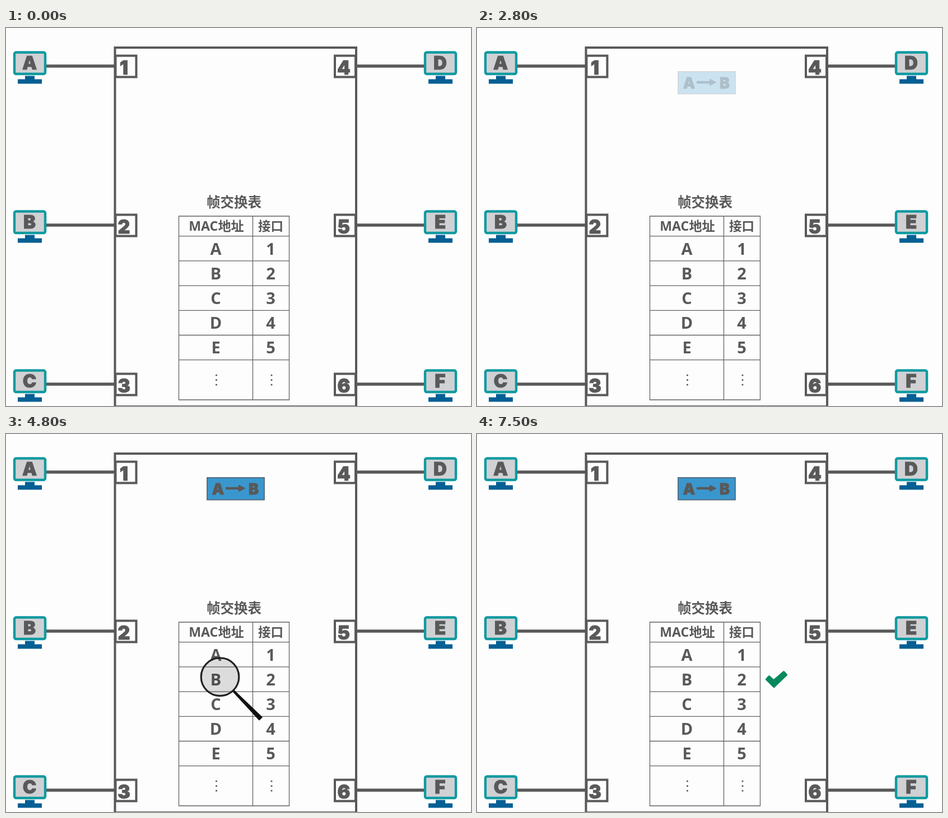
An HTML page for the animation above (8 s loop, 830 by 675 pixels).

```html
<!DOCTYPE html>
<html lang="zh-CN">
<head>
<meta charset="utf-8">
<title>帧交换表</title>
<style>
  html, body { margin: 0; width: 100%; height: 100%; overflow: hidden; background: #fdfdfd; }
  svg { display: block; width: 100vw; height: 100vh; }
  text { fill: #595959; text-anchor: middle; }
  .heavy { font-family: Inter, "Liberation Sans", sans-serif; font-weight: 900; stroke: #595959; stroke-width: .9; }
  .cell { font: 700 29px "Open Sans", "Noto Sans", sans-serif; }
  .han { font-family: "Noto Sans", "Noto Sans CJK SC", "Noto Sans CJK", sans-serif; font-weight: 700; }
</style>
</head>
<body>
<svg id="stage" viewBox="0 0 830 675">
  <g id="network"></g>
  <g id="table"></g>
  <g id="packet">
    <rect x="1" y="1" width="102" height="39.5" fill="#3a97ce" stroke="#52687a" stroke-width="1.8"/>
    <text class="heavy" font-size="27" x="20.5" y="31">A</text>
    <text class="heavy" font-size="27" x="84" y="31">B</text>
    <path d="M34 17.8H57V13.5L70 20L57 26.5V22.2H34Z" fill="#595959"/>
  </g>
  <g id="lens">
    <circle r="33.8" fill="#000" fill-opacity=".13" stroke="#222" stroke-width="3.2"/>
    <path d="M22.5 26.5L25.5 23.5L76 72L70 78Z" fill="#111"/>
  </g>
  <path id="check" d="M-18 0L-13 -5.5L-5 2L13 -13.5L18 -8L-4.5 13.5Z"
        fill="#07895f" stroke="#07895f" stroke-width="3.2" stroke-linejoin="round"/>
</svg>
<script>
const $ = id => document.getElementById(id);
const LOOP = 8000, STEP = 100, GREY = '#595959';

const text = (x, y, size, cls, s) =>
  `<text x="${x}" y="${y}" font-size="${size}" class="${cls}">${s}</text>`;

function station(name, port, right, y) {
  const x = right ? 746 : 13;
  const px = right ? 587 : 195.5;
  const [from, to] = right ? [625, 747] : [71, 195];
  return `
    <path d="M${from} ${y}H${to}" stroke="${GREY}" stroke-width="5.5"/>
    <rect x="${px}" y="${y - 18.5}" width="37" height="38" fill="#fdfdfd" stroke="${GREY}" stroke-width="4"/>
    ${text(right ? 603 : 210.5, y + 14.5, 34, 'heavy', port)}
    <rect x="${x + 2}" y="${y - 24.5}" width="55" height="38.5" rx="3" fill="#d0d1d4" stroke="#0e9aa0" stroke-width="4.4"/>
    <path d="M${x + 21} ${y + 17.5}h17v6h13v8h-43v-8h13z" fill="#035f94"/>
    ${text(x + 29, y + 5.5, 33, 'heavy', name)}`;
}

function drawNetwork() {
  let out = `<rect x="194.5" y="35" width="430.5" height="641" fill="none" stroke="${GREY}" stroke-width="4"/>`;
  [...'ABCDEF'].forEach((name, i) => {
    out += station(name, i + 1, i > 2, 68 + 284 * (i % 3));
  });
  $('network').innerHTML = out;
}

function drawTable() {
  let lines = 'M308.5 336H505.5V664H308.5ZM440.5 336V664';
  let out = text(407, 320, 24.5, 'han', '帧交换表')
    + text(375.5, 362, 23.2, 'han', 'MAC地址')
    + text(472.5, 362, 22.5, 'han', '接口');
  [...'ABCDE'].forEach((name, i) => {
    const y = 404.5 + 44.2 * i;
    out += text(374.5, y, 29, 'cell', name) + text(472.5, y, 29, 'cell', i + 1);
  });
  for (let i = 0; i < 6; i++) lines += `M308.5 ${371.7 + 44.2 * i}H505.5`;
  for (const x of [375.5, 474])
    for (const y of [620, 628.5, 637]) out += `<circle cx="${x}" cy="${y}" r="1.6" fill="${GREY}"/>`;
  $('table').innerHTML = `<path d="${lines}" fill="none" stroke="#636363" stroke-width="1.3"/>` + out;
}

const part = (t, a, b) => Math.min(1, Math.max(0, (t - a) / (b - a)));
const mix = (a, b, k) => a + (b - a) * k;
const easeOut = k => 1 - (1 - k) ** 2;

// each shape of a part fades on its own, so text stays readable over its box
function place(id, x, y, alpha, scale = 1) {
  const el = $(id);
  el.setAttribute('transform', `translate(${x} ${y}) scale(${scale})`);
  for (const shape of el.children.length ? el.children : [el]) shape.setAttribute('opacity', alpha);
}

function render(t) {
  // packet: slides in beside A, fades into port 1, reappears inside the switch
  if (t < 2700) {
    const enter = part(t, 500, 900), leave = part(t, 2050, 2700);
    place('packet', mix(38, 78, easeOut(enter)) + 100 * leave, 79, enter * (1 - leave));
  } else {
    place('packet', 358, 77, part(t, 2700, 3100));
  }

  // lens scans down the address column
  const seen = t >= 4700 ? 1 - part(t, 5500, 5700) : 0;
  place('lens', 382, mix(406, 628, part(t, 4700, 5500)), seen);

  // check mark pops in with a small overshoot
  const grow = part(t, 5500, 5800), settle = part(t, 5800, 6200);
  const size = mix(1.14 * grow, 1, easeOut(settle));
  place('check', mix(533, 534.5, settle), 438.2, grow, size);
}

drawNetwork();
drawTable();
const start = performance.now();
function tick() {
  const t = (performance.now() - start) % LOOP;
  render(Math.floor(t / STEP) * STEP);
  requestAnimationFrame(tick);
}
tick();
</script>
</body>
</html>
```
